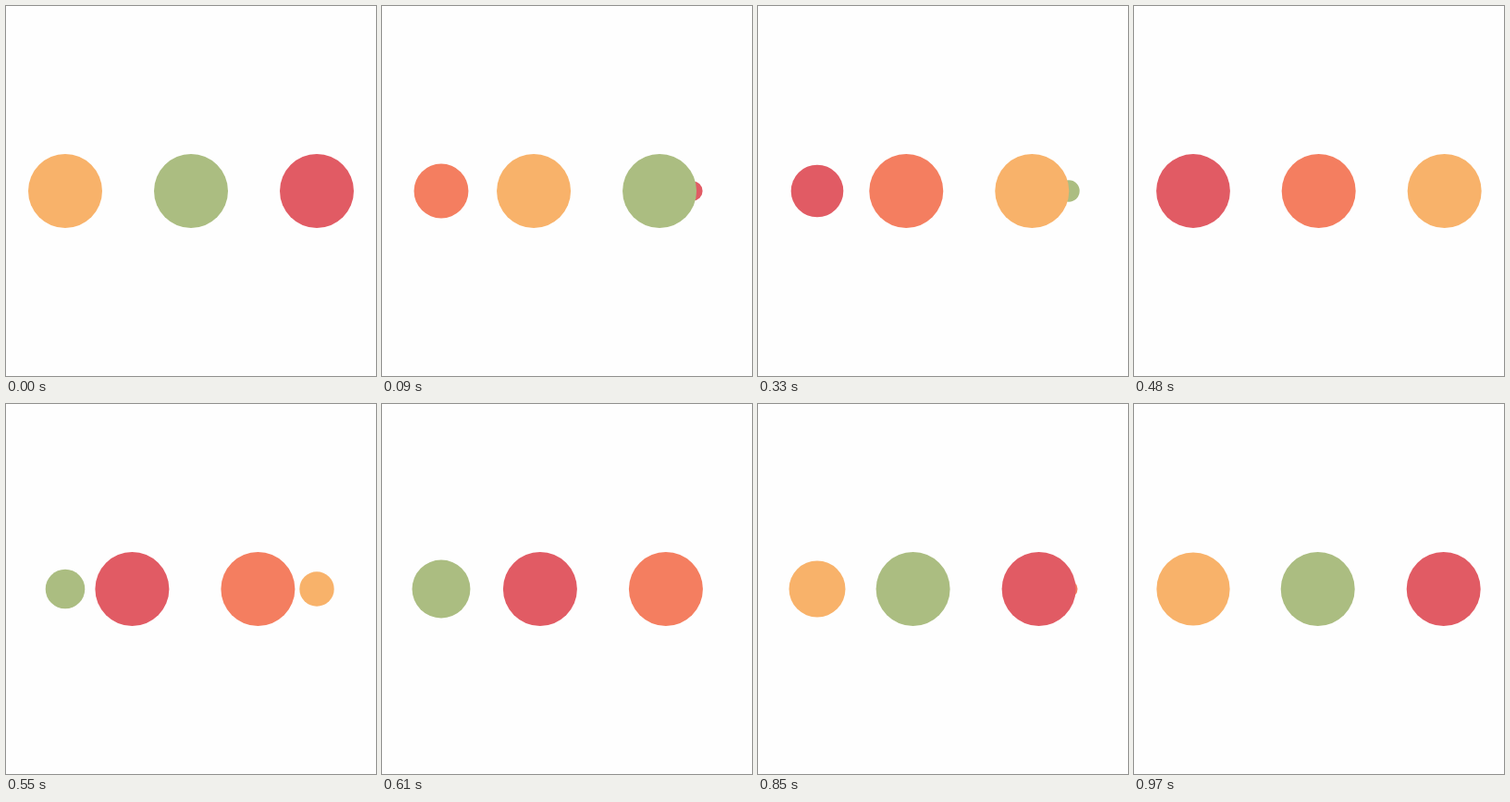
These frames come from a looping animation (400 px wide and 400 px high, 1000 ms). An HTML page with a canvas:

```html
<!DOCTYPE html>
<html lang="en">
<head>
<meta charset="utf-8">
<title>Loading dots</title>
<style>
html, body { margin: 0; width: 100%; height: 100%; overflow: hidden; background: #fefefe; }
canvas { display: block; width: 100vmin; height: 100vmin; }
</style>
</head>
<body>
<canvas width="400" height="400"></canvas>
<script>
const ctx = document.querySelector('canvas').getContext('2d');
const COLORS = ['#e15b64', '#f47e60', '#f8b26a', '#abbd81'];
const LEFT = 64, GAP = 136, RADIUS = 40, LOOP = 1000, STEPS = 33;

// cubic-bezier(0, 0.5, 0.5, 1)
function ease(x) {
  let lo = 0, hi = 1;
  for (let i = 0; i < 30; i++) {
    const u = (lo + hi) / 2;
    if (1.5 * u * u - 0.5 * u ** 3 < x) lo = u; else hi = u;
  }
  return 1.5 * lo - 0.5 * lo ** 3;
}

function dot(x, r, color) {
  ctx.fillStyle = color;
  ctx.beginPath();
  ctx.arc(x, 200, r, 0, Math.PI * 2);
  ctx.fill();
}

// 33 even steps per loop; the one at 480 ms is held 10 ms longer
function stepAt(ms) {
  const t = ms + 0.01;
  return t < 490 ? Math.floor(t / 30) : Math.floor((t - 10) / 30);
}

function draw(ms) {
  const phase = Math.min(stepAt(ms), STEPS - 1) / STEPS * 4;
  const beat = Math.floor(phase);
  const e = ease(phase - beat);

  ctx.fillStyle = '#fefefe';
  ctx.fillRect(0, 0, 400, 400);

  // leaving dot shrinks at the right, behind the others
  dot(LEFT + 2 * GAP, RADIUS * (1 - e), COLORS[(4 - beat) % 4]);

  // stages: 0 hidden, 1 growing, 2 and 3 sliding right
  COLORS.forEach((color, i) => {
    const stage = (beat + i) % 4;
    if (stage === 1) dot(LEFT, RADIUS * e, color);
    if (stage > 1) dot(LEFT + GAP * (stage - 2 + e), RADIUS, color);
  });
}

function tick() {
  draw(performance.now() % LOOP);
  requestAnimationFrame(tick);
}
tick();
</script>
</body>
</html>
```
